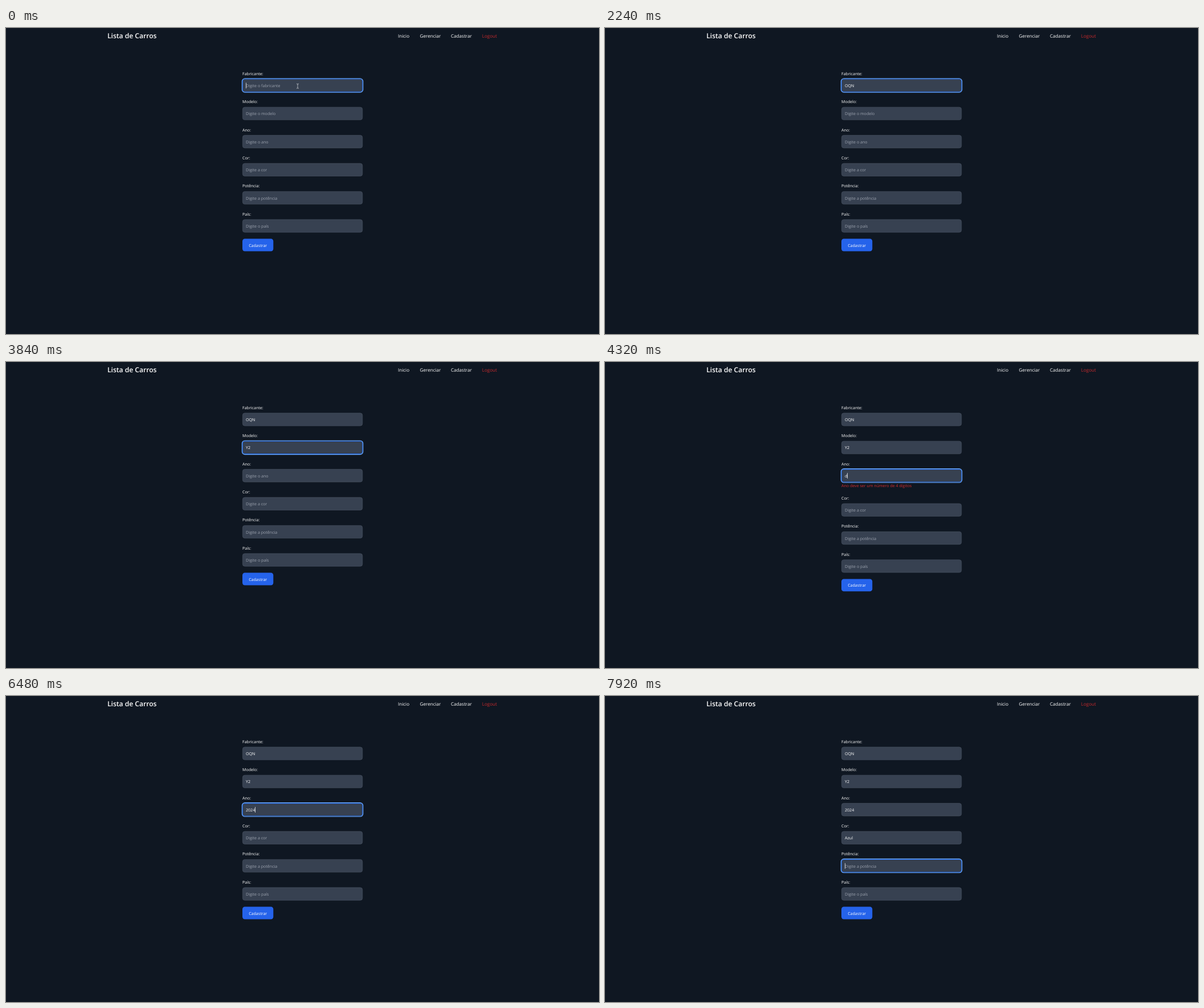
An HTML page for the animation above (8000 ms loop, 1041 by 538 pixels).

```html
<!DOCTYPE html>
<html lang="pt">
<head>
<meta charset="utf-8">
<title>Lista de Carros</title>
<style>
  html, body { margin: 0; width: 100%; height: 100%; overflow: hidden; background: #0f1722; }
  svg { display: block; width: 1041px; height: 538px; }
  text { font: 7.08px "Open Sans", "Noto Sans", sans-serif; fill: #fff; text-rendering: geometricPrecision; white-space: pre; }
  .title { font-size: 12.1px; font-weight: 600; }
  .nav { font-size: 8.1px; }
  .logout { fill: #c52a2d; }
  .error { fill: #d62c2c; }
  .box { fill: #374151; stroke: #4b5563; stroke-width: .6; }
  .empty { fill: #9ca3af; }
  .ring { fill: none; }
  .outer { stroke: #70adfb; stroke-width: 1.1; }
  .inner { stroke: #1d62e0; stroke-width: 1.1; }
  .caret { fill: #fff; }
  .pointer { fill: none; stroke: #c3c7cd; stroke-width: .8; }
</style>
</head>
<body>
<svg id="stage" viewBox="0 0 1041 538">
  <text class="title" x="178" y="18">Lista de Carros</text>
  <text class="nav" x="688" y="16.6">Inicio</text>
  <text class="nav" x="726.6" y="16.6">Gerenciar</text>
  <text class="nav" x="781" y="16.6">Cadastrar</text>
  <text class="nav logout" x="835.7" y="16.6">Logout</text>
  <text class="error" id="error" x="415" y="220.3">Ano deve ser um número de 4 dígitos</text>
</svg>
<script>
const LOOP = 8000, STEP = 49.4, ERROR_SHIFT = 10.9, BLINK = 500;
const stage = document.getElementById('stage');
const error = document.getElementById('error');

function add(parent, tag, attrs, content = '') {
  const el = document.createElementNS('http://www.w3.org/2000/svg', tag);
  for (const key in attrs) el.setAttribute(key, attrs[key]);
  el.textContent = content;
  return parent.appendChild(el);
}

const fields = [
  ['Fabricante:', 'Digite o fabricante'],
  ['Modelo:', 'Digite o modelo'],
  ['Ano:', 'Digite o ano'],
  ['Cor:', 'Digite a cor'],
  ['Potência:', 'Digite a potência'],
  ['País:', 'Digite o país']
].map(([label, hint]) => {
  const g = add(stage, 'g', {});
  add(g, 'text', { x: 415, y: 82.8 }, label);
  add(g, 'rect', { class: 'box', x: 415.3, y: 89.8, width: 210.5, height: 22.4, rx: 4 });
  return { g, hint, text: add(g, 'text', { x: 421, y: 104 }) };
});

const button = add(stage, 'g', {});
add(button, 'rect', { x: 415, y: 370.6, width: 54.3, height: 21.8, rx: 4.3, fill: '#2563eb' });
add(button, 'text', { x: 442.2, y: 384.6, 'text-anchor': 'middle' }, 'Cadastrar');

const focus = add(stage, 'g', {});
add(focus, 'rect', { class: 'ring inner', x: 415.3, y: 89.8, width: 210.5, height: 22.4, rx: 4 });
add(focus, 'rect', { class: 'ring outer', x: 414.3, y: 88.8, width: 212.5, height: 24.4, rx: 5 });
const caret = add(focus, 'rect', { class: 'caret', y: 96.2, width: .7, height: 10 });
const pointer = add(stage, 'path', {
  class: 'pointer',
  d: 'M510 98 Q512 98 512 99.2 Q512 98 514 98 M512 99 V105.3 M510 106.2 Q512 106.2 512 105 Q512 106.2 514 106.2'
});

// [time, focused field, its value]
const events = [
  [0, 0, ''], [1040, 0, 'O'], [1280, 0, 'OQ'], [1680, 0, 'OQN'],
  [2480, 1, ''], [3040, 1, 'Y'], [3280, 1, 'Y2'],
  [3920, 2, ''], [4160, 2, 'd'], [5040, 2, ''],
  [5920, 2, '2'], [6080, 2, '20'], [6240, 2, '202'], [6400, 2, '2024'],
  [6800, 3, ''], [7120, 3, 'A'], [7280, 3, 'Az'], [7360, 3, 'Azu'], [7520, 3, 'Azul'],
  [7680, 4, '']
];

const move = (el, y) => el.setAttribute('transform', `translate(0 ${y})`);
const show = (el, on) => el.setAttribute('visibility', on ? 'visible' : 'hidden');

function draw(now) {
  const t = now % LOOP;
  const past = events.filter(e => e[0] <= t);
  const [since, active] = past[past.length - 1];
  const values = fields.map(() => '');
  for (const [, i, value] of past) values[i] = value;

  const invalid = t >= 4160 && t < 6400;
  const shift = i => i > 2 && invalid ? ERROR_SHIFT : 0;
  show(error, invalid);
  fields.forEach((f, i) => {
    move(f.g, i * STEP + shift(i));
    f.text.textContent = values[i] || f.hint;
    f.text.setAttribute('class', values[i] ? '' : 'empty');
  });
  move(button, shift(6));
  move(focus, active * STEP + shift(active));

  const width = values[active] ? fields[active].text.getComputedTextLength() : 0;
  caret.setAttribute('x', 421 + width);
  show(caret, Math.floor((t - since) / BLINK) % 2 === 0);
  show(pointer, t < 1040);
}

function tick() {
  draw(performance.now());
  requestAnimationFrame(tick);
}
tick();
</script>
</body>
</html>
```
